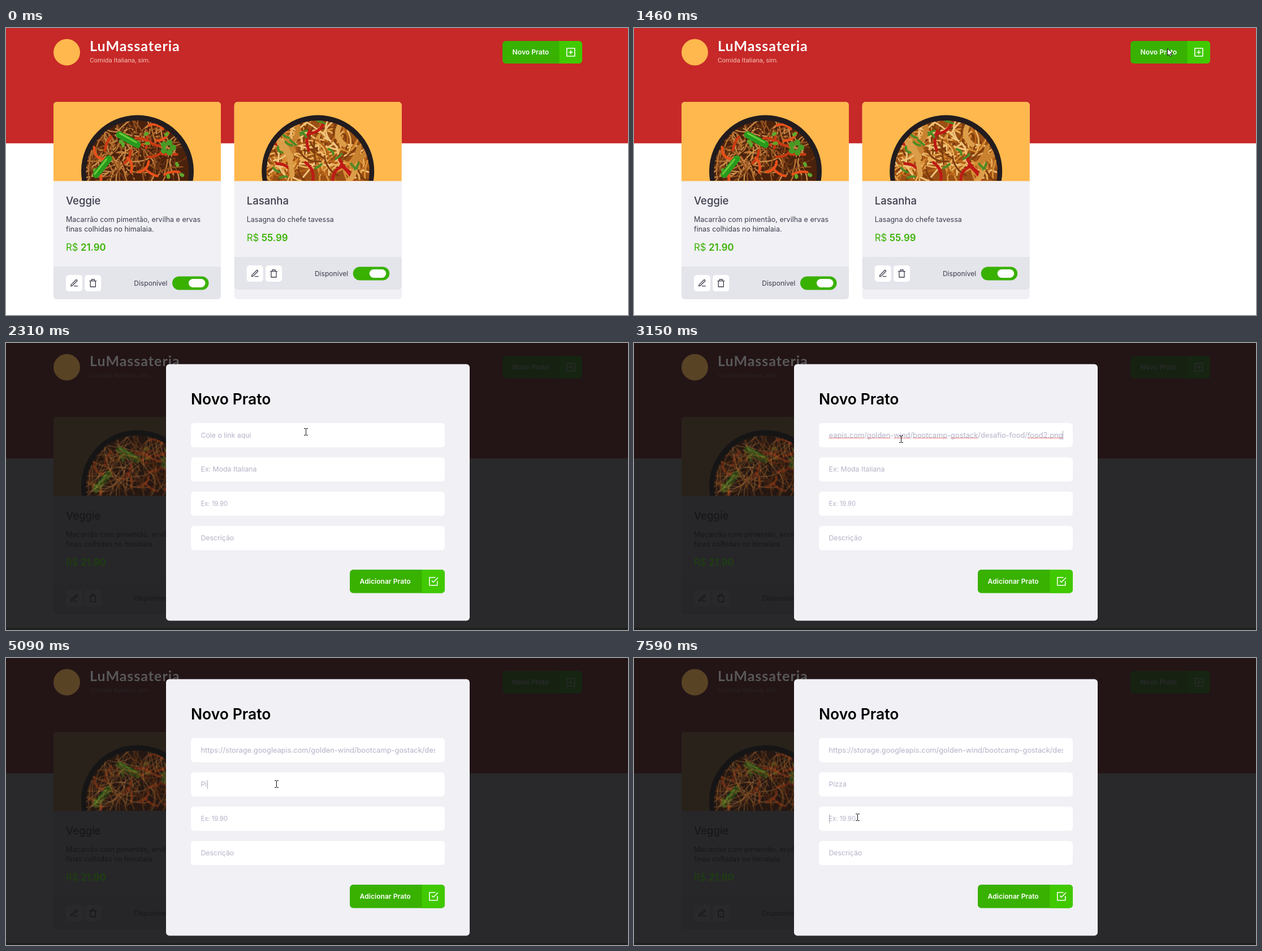
An HTML page with a canvas that plays this animation: 1100 by 509 pixels, repeating every 8 s.

```html
<!DOCTYPE html>
<html lang="pt-BR">
<head>
<meta charset="utf-8">
<title>Novo Prato</title>
<style>
html, body { margin: 0; width: 100%; height: 100%; overflow: hidden; background: #fff; }
canvas { display: block; }
</style>
</head>
<body>
<canvas id="stage" width="1100" height="509"></canvas>
<script>
const ctx = document.getElementById('stage').getContext('2d');
const LOOP = 8000, OPEN = 1530, FOCUS = 2620, PASTE = 3150, BLUR = 3930, NEXT = 4100, LAST = 7590;
const BLINK = 530;
const UI = 'Inter, sans-serif';
const INK = '#3d3d4d', GREEN = '#39b100', LIME = '#41c900', PANEL = '#f0f0f5', HINT = '#b2b2c8';
const LINK = 'https://storage.googleapis.com/golden-wind/bootcamp-gostack/desafio-food/food2.png';
const LINK_FONT = `12.85px ${UI}`, FIELD_FONT = `12.3px ${UI}`;
const HINTS = ['Cole o link aqui', 'Ex: Moda Italiana', 'Ex: 19.90', 'Descrição'];
const DISH = 'Pizza';

const fieldY = row => 142 + 60.8 * row;
// Typing speeds up slightly from key to key.
const keyTime = i => 4860 + i * (246 - 17 * i);

const ICONS = {
  edit: 'M12 20h9M16.5 3.5a2.12 2.12 0 0 1 3 3L7 19l-4 1 1-4z',
  trash: 'M3 6h18M19 6v16H5V6m3 0V2h8v4',
  plus: 'M3 3h18v18H3zM12 8v8M8 12h8',
  check: 'M9 11l3 3L22 4M21 12v9H3V3h13'
};
for (const name in ICONS) ICONS[name] = new Path2D(ICONS[name]);
const ARROW = new Path2D('M.5 .5v12l3-2 2 4 2-1-2-4h4z');

function rect(x, y, w, h, color) {
  ctx.fillStyle = color;
  ctx.fillRect(x, y, w, h);
}

function box(x, y, w, h, r, color) {
  ctx.beginPath();
  ctx.roundRect(x, y, w, h, r);
  ctx.fillStyle = color;
  ctx.fill();
}

function disc(x, y, r, color) {
  box(x - r, y - r, 2 * r, 2 * r, r, color);
}

function text(str, x, y, font, color, align = 'left') {
  ctx.font = font;
  ctx.fillStyle = color;
  ctx.textAlign = align;
  ctx.fillText(str, x, y);
}

function icon(name, cx, cy, scale, color) {
  ctx.save();
  ctx.translate(cx, cy);
  ctx.scale(scale, scale);
  ctx.translate(-12, -12);
  ctx.lineWidth = 2;
  ctx.lineCap = ctx.lineJoin = 'round';
  ctx.strokeStyle = color;
  ctx.stroke(ICONS[name]);
  ctx.restore();
}

function random(seed) {
  return () => (seed = seed * 16807 % 2147483647) / 2147483647;
}

// Strews bent strokes over the upper half of a bowl.
function strew(rnd, count, length, width, colors) {
  ctx.lineWidth = width;
  ctx.lineCap = 'round';
  for (let i = 0; i < count; i++) {
    const place = rnd() * 3.5 - 0.18, r = 88 * Math.sqrt(rnd());
    ctx.save();
    ctx.translate(r * Math.cos(place), -r * Math.sin(place));
    ctx.rotate(rnd() * Math.PI);
    ctx.beginPath();
    ctx.moveTo(-length / 2, 0);
    ctx.quadraticCurveTo(0, (rnd() - 0.5) * length, length / 2, 0);
    ctx.strokeStyle = colors[i % colors.length];
    ctx.stroke();
    ctx.restore();
  }
}

function veggie(rnd) {
  strew(rnd, 190, 44, 2.3, ['#b87332', '#4a210d', '#95521f', '#c98b48', '#6d3513']);
  strew(rnd, 16, 26, 4.5, ['#e8501a', '#c93a12']);
  strew(rnd, 9, 3, 6, ['#5fa52a']);
  for (const [x, y, tilt] of [[-16, -56, 0.5], [-62, -8, -0.9]]) {
    ctx.save();
    ctx.translate(x, y);
    ctx.rotate(tilt);
    box(-24, -6, 48, 12, 6, '#279a1d');
    box(-20, -4, 36, 3, 1.5, '#6acb3c');
    ctx.restore();
  }
  for (let a = 0; a < 6; a += 1.25) disc(54 + 9 * Math.cos(a), -42 + 9 * Math.sin(a), 5.5, '#479a24');
}

function pasta(rnd) {
  strew(rnd, 180, 42, 3, ['#d98f35', '#7d3c0e', '#e9ae58', '#b8651a', '#f0c47c']);
  strew(rnd, 8, 34, 5, ['#bf1a16']);
  strew(rnd, 9, 34, 9, ['#dc9d48', '#c9822f']);
  strew(rnd, 14, 13, 4, ['#4d8a25']);
}

function bowl(cx, base, seed, fill) {
  ctx.save();
  ctx.beginPath();
  ctx.rect(cx - 148, 131, 296, 140);
  ctx.clip();
  ctx.translate(cx, 254);
  disc(0, 0, 99.5, '#221c1f');
  ctx.beginPath();
  ctx.arc(0, 1, 91, 0, 7);
  ctx.clip();
  rect(-100, -100, 200, 200, base);
  fill(random(seed));
  ctx.restore();
}

const veggieBowl = () => bowl(232.5, '#4a220c', 71, veggie);
const pastaBowl = () => bowl(551.7, '#9a4f14', 23, pasta);

function price(x, y, value) {
  text('R$', x, y, `16.8px ${UI}`, GREEN);
  text(value, x + 26, y, `600 16.8px ${UI}`, GREEN);
}

function card(x, name, lines, value, dish) {
  const drop = (lines.length - 1) * 17, foot = 406 + drop;
  box(x, 131, 296, 350, 6, PANEL);
  box(x, 131, 296, 140.5, [6, 6, 0, 0], '#ffb84d');
  dish();
  text(name, x + 22, 313, `500 18.5px ${UI}`, INK);
  lines.forEach((s, n) => text(s, x + 22, 343.5 + 17.3 * n, `12.5px ${UI}`, INK));
  price(x + 22, 378 + drop, value);

  box(x, foot, 296, 58, [0, 0, 6, 6], '#e4e4eb');
  ['edit', 'trash'].forEach((tool, i) => {
    const left = x + 22 + 33.3 * i;
    box(left, foot + 15, 29, 29, 5, '#fff');
    icon(tool, left + 14.5, foot + 29.5, 0.65, INK);
  });
  text('Disponível', x + 201.5, foot + 33.5, `12.1px ${UI}`, INK, 'right');
  box(x + 210, foot + 17.5, 64.5, 24, 12, GREEN);
  box(x + 239, foot + 22, 29.5, 15, 7.5, '#fff');
}

function brand() {
  disc(107.5, 43, 23.5, '#ffb84d');
  ctx.letterSpacing = '1px';
  text('LuMassateria', 148, 41, 'bold 25px Lato, sans-serif', '#fff');
  ctx.letterSpacing = '0px';
}

function button(x, y, w, h, label, name) {
  box(x, y, w, h, 6, GREEN);
  box(x + w - 40.5, y, 40.5, h, [0, 6, 6, 0], LIME);
  text(label, x + 17.6, y + h / 2 + 3.8, `600 12.1px ${UI}`, '#fff');
  icon(name, x + w - 20.2, y + h / 2, 0.78, '#fff');
}

function page() {
  rect(0, 0, 1100, 509, '#fff');
  rect(0, 0, 1100, 204.5, '#c72828');
  brand();
  text('Comida Italiana, sim.', 148, 61, '11.5px Roboto, sans-serif', '#f2c4b4');
  button(878, 23, 141, 40, 'Novo Prato', 'plus');
  card(84, 'Veggie', ['Macarrão com pimentão, ervilha e ervas', 'finas colhidas no himalaia.'], '21.90', veggieBowl);
  card(403.7, 'Lasanha', ['Lasagna do chefe tavessa'], '55.99', pastaBowl);
}

function shade() {
  rect(0, 0, 1100, 509, 'rgba(18,18,20,.9)');
  rect(0, 505.5, 1100, 4, 'rgba(0,0,0,.25)');
  // Small details stay a little brighter than the backdrop.
  ctx.globalAlpha = 0.22;
  brand();
  veggieBowl();
  price(106, 395, '21.90');
  ctx.globalAlpha = 1;
}

function pastedLink() {
  const end = 758.5, width = s => ctx.measureText(s).width;
  text(LINK, end, 167.5, LINK_FONT, HINT, 'right');
  const left = end - width(LINK);
  for (const word of ['storage.googleapis.com', 'golden', 'wind', 'bootcamp', 'gostack', 'food2.png']) {
    const before = LINK.slice(0, LINK.indexOf(word));
    rect(left + width(before), 168, width(word), 1, '#f47c7c');
  }
}

function typed(t) {
  let n = 0;
  while (n < DISH.length && t >= keyTime(n)) n++;
  return DISH.slice(0, n);
}

function field(row, t) {
  const y = fieldY(row);
  box(327, y, 449, 43, 6, '#fff');
  ctx.save();
  ctx.beginPath();
  ctx.rect(344.5, y, 414.5, 43);
  ctx.clip();
  if (row === 0 && t >= PASTE) {
    if (t < BLUR) pastedLink();
    else text(LINK, 344.5, y + 25.5, LINK_FONT, HINT);
  } else {
    const value = row === 1 && typed(t) || HINTS[row];
    text(value, 344.5, y + 25.5, row === 2 ? `11.2px ${UI}` : FIELD_FONT, HINT);
  }
  ctx.restore();
}

// The caret restarts its blinking at each click, paste or key.
function caret(t) {
  const keys = [...DISH].map((_, i) => keyTime(i));
  const since = Math.max(...[FOCUS, PASTE, NEXT, ...keys, LAST].filter(e => e <= t));
  if (t < FOCUS || Math.floor((t - since) / BLINK) % 2) return;
  const row = t < NEXT ? 0 : t < LAST ? 1 : 2;
  ctx.font = FIELD_FONT;
  let x = 345;
  if (row === 0 && t >= PASTE) x = 758;
  if (row === 1) x += ctx.measureText(typed(t)).width;
  rect(Math.round(x), fieldY(row) + 13.5, 1, 16, '#a9a9bd');
}

function modal(t) {
  box(283, 37.5, 537, 455, 6, PANEL);
  text('Novo Prato', 327, 109, `600 26.5px ${UI}`, '#000');
  button(608, 402, 168, 41.5, 'Adicionar Prato', 'check');
  HINTS.forEach((_, row) => field(row, t));
  caret(t);
}

// Moves happen in a few equal steps, each one eased along a quadratic path.
function glide(t, from, to, steps, [x0, y0], [cx, cy], [x1, y1]) {
  const step = Math.floor((t - from) / (to - from) * (steps - 1) + 1e-6) + 1;
  const p = Math.min(1, step / steps);
  const k = p * p * (3 - 2 * p), q = 1 - k;
  return [q * q * x0 + 2 * q * k * cx + k * k * x1, q * q * y0 + 2 * q * k * cy + k * k * y1];
}

function pointerAt(t) {
  const onButton = [943, 36], onLink = [472, 170], onDish = [478, 223];
  if (t < 1840) return glide(t, 370, 1140, 11, [836, 56], [900, 54], onButton);
  if (t < 3380) return glide(t, 1840, 2450, 9, onButton, [700, 120], onLink);
  if (t < 6980) return glide(t, 3380, 3700, 5, onLink, [474, 196], onDish);
  return glide(t, 6980, LAST, 9, onDish, [462, 138], [395, 282]);
}

function arrow(x, y) {
  ctx.save();
  ctx.translate(x, y);
  ctx.fillStyle = '#fff';
  ctx.fill(ARROW);
  ctx.lineWidth = 1;
  ctx.strokeStyle = '#111';
  ctx.stroke(ARROW);
  ctx.restore();
}

function beam(x, y) {
  x = Math.round(x);
  y = Math.round(y);
  rect(x, y - 5, 1, 11, '#111');
  for (const dy of [-6, 6]) {
    rect(x - 3, y + dy, 3, 1, '#111');
    rect(x + 1, y + dy, 3, 1, '#111');
  }
}

function pointer(t) {
  if (t < 370) return;
  const [x, y] = pointerAt(t);
  const overField = t >= OPEN && x > 327 && x < 776 &&
    HINTS.some((_, row) => y >= fieldY(row) && y <= fieldY(row) + 43);
  (overField ? beam : arrow)(x, y);
}

function draw(t) {
  page();
  if (t >= OPEN) {
    shade();
    modal(t);
  }
  pointer(t);
}

const start = performance.now();
function tick() {
  draw((performance.now() - start) % LOOP);
  requestAnimationFrame(tick);
}
tick();
</script>
</body>
</html>
```
